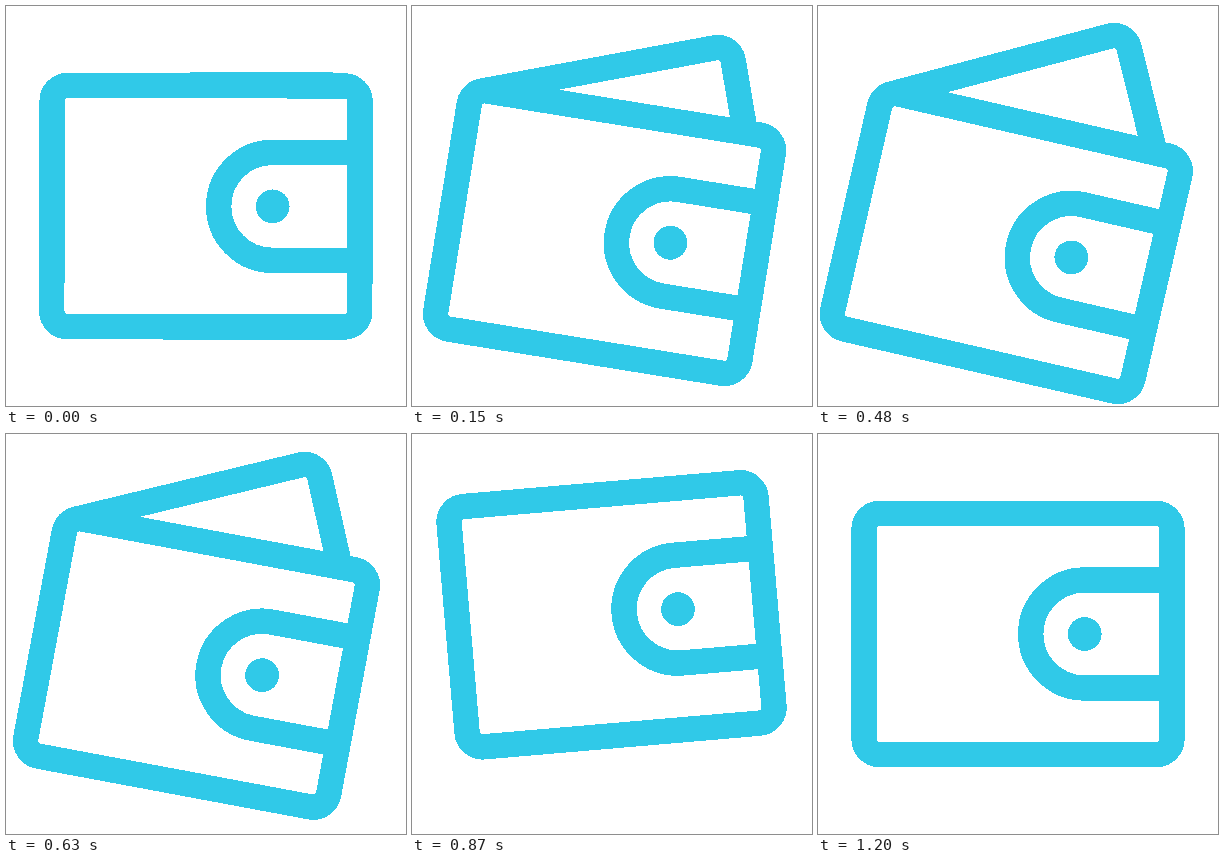
An HTML page for the animation above (2.23 s loop, 400 px wide and 400 px high).

```html
<!DOCTYPE html>
<html lang="en">
<head>
<meta charset="utf-8">
<title>Wallet</title>
<style>
  :root { --ink: #30c9e8; }
  html, body {
    margin: 0;
    width: 100%;
    height: 100%;
    overflow: hidden;
    background: #fff;
  }
  svg {
    display: block;
    width: 100%;
    height: 100%;
    fill: none;
    stroke: var(--ink);
    stroke-width: 25.4;
    shape-rendering: crispEdges;
  }
  .wallet, .card, .edge {
    animation-duration: 2230ms;
    animation-iteration-count: infinite;
    animation-timing-function: cubic-bezier(.333, 0, .667, 1);
  }
  .wallet {
    transform-origin: 33.3px 166.7px;
    animation-name: tilt, drift;
  }
  .card {
    transform-origin: 61.6px 95px;
    animation-name: lift;
  }
  .edge { animation-name: slide; }
  .body { fill: #fff; }
  .dot { fill: var(--ink); stroke: none; }

  @keyframes tilt {
    0% { rotate: 0deg; animation-timing-function: cubic-bezier(.165, .67, .33, 1); }
    24.75% { rotate: 13deg; }
    40.22% { rotate: -5.2deg; }
    53.81%, 100% { rotate: 0deg; }
  }
  @keyframes drift {
    0%, 24.75% { translate: 0 0; }
    36.6%, 40.22% { translate: -2.7px -4.8px; }
    53.81%, 100% { translate: 0 0; }
  }
  @keyframes lift {
    0% { rotate: 0deg; animation-timing-function: cubic-bezier(.165, .67, .33, 1); }
    24.75%, 25.56% { rotate: -27.9deg; }
    37.45%, 100% { rotate: 0deg; }
  }
  /* The card's far edge draws in as the card lifts. */
  @keyframes slide {
    0% { translate: 0 0; animation-timing-function: cubic-bezier(.165, .67, .33, 1); }
    24.75%, 25.56% { translate: -36.7px 0; }
    37.45%, 100% { translate: 0 0; }
  }
</style>
</head>
<body>
<svg viewBox="0 0 400 400" aria-label="Wallet">
  <g class="wallet">
    <g class="card">
      <path d="M46 95a15.6 15.6 0 0 1 15.6-15.6H240"/>
      <path class="edge" d="M160 79.4H324.6a15.6 15.6 0 0 1 15.6 15.6l-1.9 120"/>
    </g>
    <rect class="body" x="46" y="79.4" width="308" height="241.2" rx="15.6"/>
    <path d="M354 146H266.7a54 54 0 0 0 0 108H354"/>
    <circle class="dot" cx="266.7" cy="200" r="16.9"/>
  </g>
</svg>
</body>
</html>
```
